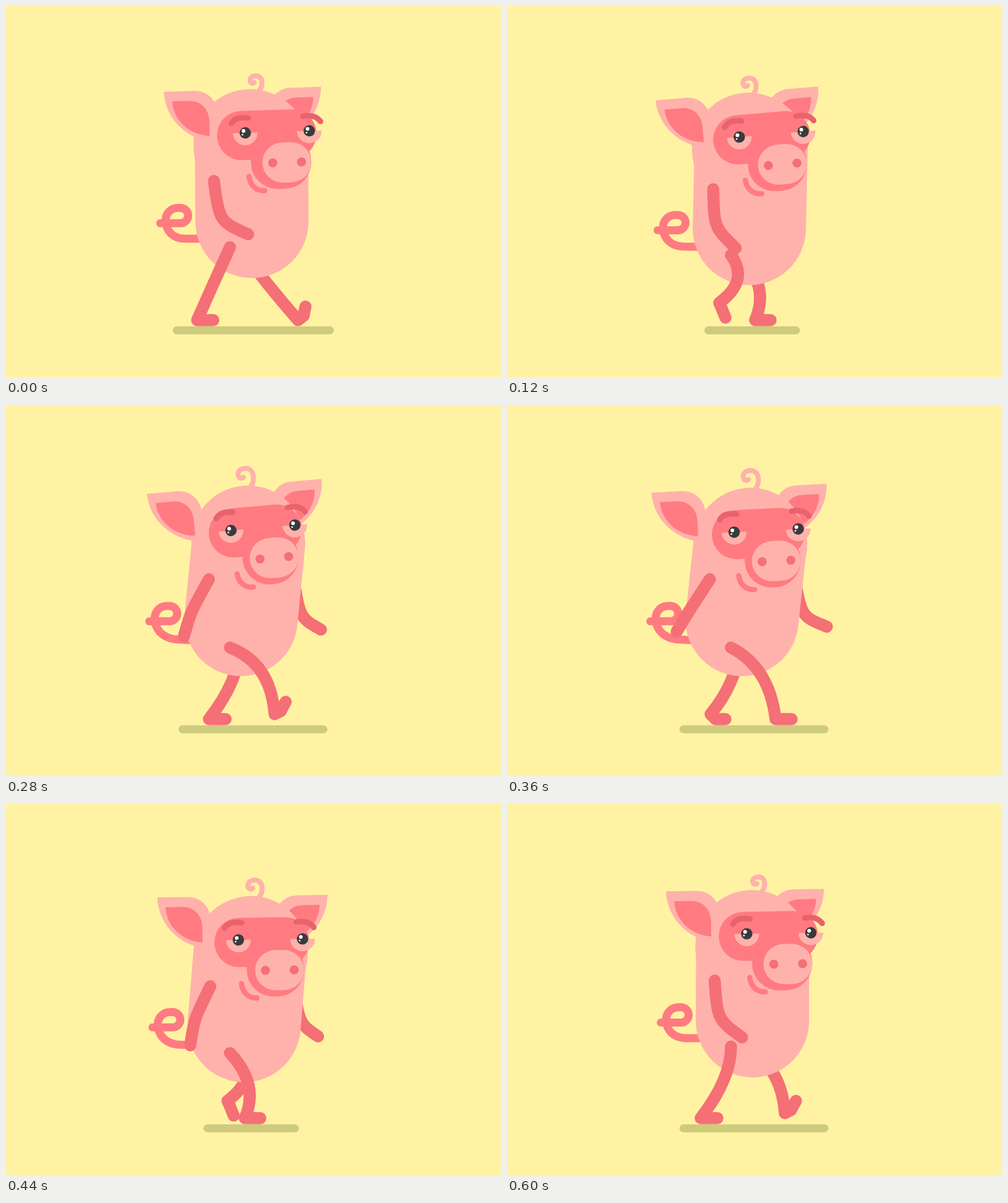
These frames come from a looping animation (800 by 600 pixels, 0.64 s). An HTML page:

```html
<!DOCTYPE html>
<html lang="en">
<head>
<meta charset="utf-8">
<title>Walking pig</title>
<style>
  html, body { margin: 0; width: 100%; height: 100%; overflow: hidden; background: #fff3a3; }
  svg { display: block; width: 800px; height: 600px; }
  .line { fill: none; stroke-linecap: round; stroke-linejoin: round; }
  .limb { stroke: #f56f76; stroke-width: 19.5; }
  .skin { fill: #ffb2ab; }
  .blush { fill: #ff7b81; }
  .brow { stroke: #e8636c; stroke-width: 9; }
</style>
</head>
<body>
<svg viewBox="0 0 800 600">
  <defs>
    <g id="ear">
      <path class="skin" d="M0 0H49C71 0 86 17 86 39V85C38 82 1 46 0 0Z"/>
      <path class="blush" d="M13 16H40C60 16 72 31 72 49V74C38 71 14 46 13 16Z"/>
    </g>
    <g id="eye">
      <path class="skin" d="M-20 0A20 20 0 0 0 20 0Z"/>
      <circle r="9.2" fill="#3a3a3c"/>
      <circle cx="-2.7" cy="-3.2" r="3" fill="#fff"/>
      <circle cx="-4.6" cy="2.8" r="1.4" fill="#fff"/>
    </g>
  </defs>

  <path id="shadow" class="line" stroke="#cfcb7e" stroke-width="13"/>
  <path id="farArm" class="line limb"/>
  <path id="farLeg" class="line limb"/>
  <path id="tail" class="line" stroke="#ff7b81" stroke-width="13"/>
  <g id="backHead"><use id="earR" href="#ear"/></g>
  <path id="torso" class="line" stroke="#ffb2ab" stroke-width="183"/>

  <g id="head">
    <circle id="skull" class="skin" cy="91.5" r="91.5"/>
    <use id="earL" href="#ear"/>
    <path id="curl" class="line" stroke="#ffb2ab" stroke-width="8" vector-effect="non-scaling-stroke"
      d="M-5 1C-1 -3 0 -7 0 -12C0 -19 -4 -23 -10 -23C-15 -23 -19 -20 -19 -16C-19 -11 -15 -10 -12.5 -12"/>
    <rect id="mask" class="blush" y="35" height="79.5" rx="39.7"/>
    <rect id="muzzle" class="blush" y="75" height="88" rx="43"/>
    <g id="face">
      <use href="#eye" x="2.4" y="70.6"/>
      <use href="#eye" x="106" y="70.6"/>
      <g id="brows" class="line brow">
        <path d="M-19.7 54.8Q-12.5 42.8 8 46.8"/>
        <path d="M96.5 46.8Q116.5 43.6 124.5 56"/>
      </g>
      <rect class="skin" x="28.6" y="88" width="79" height="65" rx="33" ry="32.5"/>
      <g fill="#f56f76">
        <circle cx="45.3" cy="120.5" r="7.3"/>
        <circle cx="91.7" cy="120.5" r="7.3"/>
      </g>
      <path class="line" stroke="#ff7b81" stroke-width="8.5" d="M6.2 141.3C7.5 155 16 165 30.8 165"/>
    </g>
  </g>

  <path id="nearArm" class="line limb"/>
  <path id="nearLeg" class="line limb"/>
</svg>

<script>
const LOOP = 640, STEP = 40;
const el = {};
document.querySelectorAll('svg [id]').forEach(n => el[n.id] = n);

const set = (id, attrs) => {
  for (const k in attrs) el[id].setAttribute(k, attrs[k]);
};
const draw = (id, d) => set(id, { d });
const mod = (a, n) => ((a % n) + n) % n;

// Eased swing: 0 at t = 0, 1 half a loop later, then back.
const swing = t => {
  const x = 1 - Math.abs(1 - mod(t, LOOP) / (LOOP / 2));
  return x * x * (3 - 2 * x);
};
const bobAt = t => swing(2 * t);

// Leg poses: time, knee control, heel, ball, toe.
const poses = [
  [0,   335, 449, 309, 508, 318, 508, 335, 508],
  [40,  354, 452, 314, 500, 322, 508, 338, 508],
  [120, 392, 444, 343, 480, 347, 489, 353, 504],
  [200, 411, 421, 387, 484, 395, 481, 411, 474],
  [280, 428, 418, 434, 500, 444, 495, 452, 480],
  [320, 406, 450, 457, 508, 466, 501, 469, 486],
  [360, 424, 424, 434, 508, 443, 508, 460, 508],
  [440, 410, 454, 386, 508, 395, 508, 411, 508],
  [520, 387, 455, 343, 508, 352, 508, 369, 508],
  [600, 362, 445, 313, 508, 322, 508, 340, 508]
];
const count = poses.length;
const pose = i => poses[mod(i, count)];
const slope = (i, k) =>
  (pose(i + 1)[k] - pose(i)[k]) / mod(pose(i + 1)[0] - pose(i)[0], LOOP);

// Smooth through a key without overshooting it.
const tangent = (i, k) => {
  const a = slope(i - 1, k), b = slope(i, k);
  return a * b > 0 ? 2 * a * b / (a + b) : 0;
};

function legPose(t) {
  t = mod(t, LOOP);
  let i = count - 1;
  while (poses[i][0] > t) i--;
  const span = mod(pose(i + 1)[0] - poses[i][0], LOOP);
  const u = (t - poses[i][0]) / span, v = 1 - u;
  return poses[i].slice(1).map((p, j) => {
    const k = j + 1, q = pose(i + 1)[k];
    return p * v * v * (1 + 2 * u) + q * u * u * (3 - 2 * u)
      + span * u * v * (v * tangent(i, k) - u * tangent(i + 1, k));
  });
}

function drawLeg(id, t, dx) {
  const [kx, ky, hx, hy, bx, by, tx, ty] = legPose(t);
  draw(id, `M${362 + dx} ${390 + 15 * bobAt(t)}Q${kx + dx} ${ky} ${hx + dx} ${hy}` +
    `L${bx + dx} ${by}L${tx + dx} ${ty}`);
}

const drawArm = (id, sx, sy, ex, ey, hx, hy) =>
  draw(id, `M${sx} ${sy}C${ex} ${ey} ${ex} ${ey} ${hx} ${hy}`);

function render(t) {
  const sway = swing(t), tilt = swing(t - 520), bob = 15 * bobAt(t);
  const arm = swing(t - 30);

  const flat = bobAt(t);
  draw('shadow', `M${276 + 58.6 * flat} 524.5H${523.5 - 67 * flat}`);

  // Head
  const hx = 387.5 - 4 * sway - 17.4 * tilt;
  const hy = 138.2 - 11.2 * tilt + 15.5 * bobAt(t - 4);
  const transform = `translate(${hx} ${hy}) rotate(${-5.8 * tilt})`;
  set('head', { transform });
  set('backHead', { transform });
  const earX = 127 + 15.5 * sway;
  set('earL', { transform: `translate(${-earX} 0)` });
  set('earR', { transform: `translate(${earX} 0) scale(-1 1)` });
  set('skull', { cx: 9.5 + 5 * sway });
  set('curl', { transform: `translate(32 2) scale(${1 + 0.3 * sway})` });
  set('mask', { x: -43.4 - 4.5 * sway, width: 161 - 11 * sway });
  set('muzzle', { x: 10 - 7 * sway, width: 97.6 - 7.5 * sway });
  set('face', { transform: `translate(${-14.5 * sway} 0)` });
  set('brows', { transform: `translate(0 ${-5.5 * sway})` });

  // Body and tail
  const dx = -18.5 * sway, dy = bob - 4 * sway;
  draw('torso', `M${397.5 + dx} ${348.5 + dy}L${397 - 5 * swing(t - 600)} ${hy + 92}`);
  draw('tail', `M249.3 351.3H282A12.4 12.4 0 0 0 282 326.5H278C266 326.5 258 336 258 346` +
    `C258 364 270 ${376 + sway} 289 ${376.3 + 4 * sway}L318 ${376.3 + 6 * sway}`);
  set('tail', { transform: `translate(${dx} ${dy})` });

  // Limbs
  const sx = 336 - 8.5 * sway, sy = 283 + 1.15 * bob - 4 * sway;
  const reach = 1 - 2 * arm, lift = arm ** 3;
  drawArm('nearArm', sx, sy,
    sx + 10 - 45 * arm, sy + 53 + 13 * (1 - arm) ** 2,
    sx + 58 - 112 * arm, sy + 102 - 17.5 * reach * reach);
  drawArm('farArm', 464, 272 + bob,
    464 + 12 * arm, 345 + bob - 5 * lift,
    451 + 66 * arm, 371 + bob - 15 * lift);
  drawLeg('nearLeg', t, 0);
  drawLeg('farLeg', t + LOOP / 2, 15);
}

const start = performance.now();
function tick() {
  const t = Math.max(0, performance.now() - start);
  render(Math.floor(t / STEP) * STEP % LOOP);
  requestAnimationFrame(tick);
}
tick();
</script>
</body>
</html>
```
